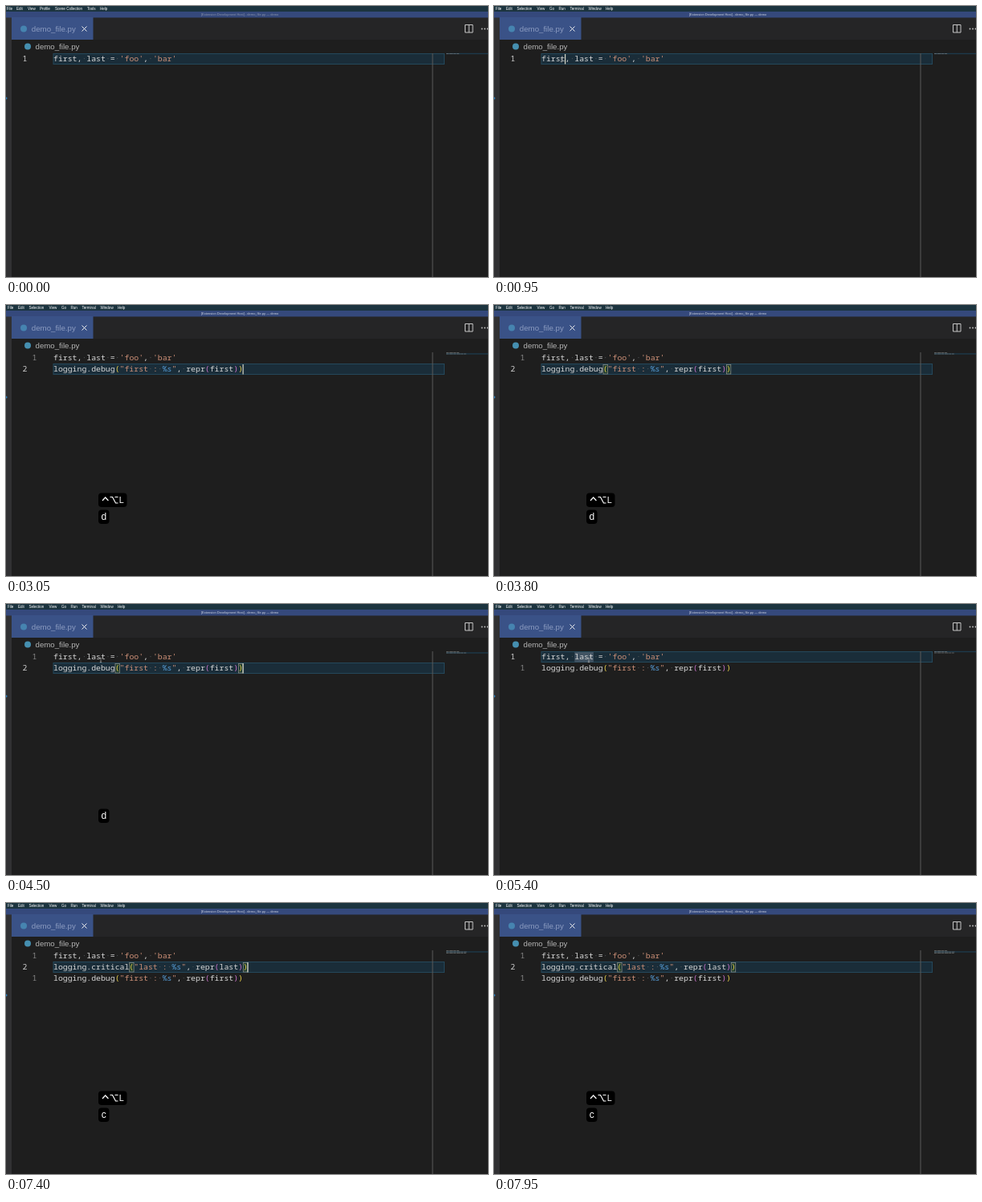
Write an HTML page that moves like this. It is 600x338 px and loops after 8 s.

```html
<!DOCTYPE html>
<html lang="en">
<head>
<meta charset="utf-8">
<title>Logging snippets</title>
<style>
html, body { margin: 0; width: 100%; height: 100%; overflow: hidden; background: #1e1e1e; }
svg { display: block; width: 100vw; height: 100vh; font-family: "Liberation Sans", Arial, sans-serif; }
.code { font: 9.833px "Noto Sans Mono", "DejaVu Sans Mono", monospace; }
</style>
</head>
<body>
<svg viewBox="0 0 600 338">
  <rect width="600" height="338" fill="#1e1e1e"/>
  <rect y="14" width="600" height="28" fill="#252526"/>
  <rect y="14" width="7" height="324" fill="#313133"/>
  <circle cy="115" r="1.5" fill="#2c7fbd"/>
  <rect width="600" height="7" fill="#1c343f"/>
  <rect y="7" width="600" height="7.5" fill="#35497c"/>
  <rect x="7" y="14" width="101.500" height="28" fill="#3a5287"/>
  <circle cx="22" cy="28.500" r="4" fill="#4684b0"/>
  <text x="31.800" y="31.800" font-size="9.700" fill="#8b9bc0">demo_file.py</text>
  <path d="M94.500 25.500l6 6m0-6l-6 6" stroke="#f2f2f2"/>
  <circle cx="27" cy="50.500" r="4" fill="#458fb0"/>
  <text x="36.500" y="53.900" font-size="9.700" fill="#b4b4b4">demo_file.py</text>
  <path d="M571.500 23.500h9.500v9.500h-9.500zM576.300 23.500v9.500" fill="none" stroke="#c5c5c5"/>
  <g fill="#c5c5c5"><circle cx="592.500" cy="28.500" r=".9"/><circle cx="596" cy="28.500" r=".9"/><circle cx="599.500" cy="28.500" r=".9"/></g>
  <g id="scene"></g>
</svg>
<script>
const LOOP = 8000, LEFT = 59, TOP = 59, ROW = 14, CHAR = 5.9;
const FOCUS = 850, KEYS1 = 2100, LOG1 = 3050, CLICK = 4850, KEYS2 = 6650, LOG2 = 7300;
const PLAIN = '#d8d8d8', STR = '#ce9178', FMT = '#569cd6', OUTER = '#e8cf4a', INNER = '#c873c8';

const idleMenu = [['File', 0.8], ['Edit', 13], ['View', 27], ['Profile', 42],
  ['Scene Collection', 61], ['Tools', 101], ['Help', 117]];
const editorMenu = [['File', 2], ['Edit', 15], ['Selection', 28.5], ['View', 53.5], ['Go', 69],
  ['Run', 80.5], ['Terminal', 94.5], ['Window', 117.5], ['Help', 139]];

const assign = [['first, last = ', PLAIN], ["'foo'", STR], [', ', PLAIN], ["'bar'", STR]];
const log = (level, name) => [
  ['logging.' + level, PLAIN], ['(', OUTER], [`"${name} : `, STR], ['%s', FMT], ['"', STR],
  [', repr', PLAIN], ['(', INNER], [name, PLAIN], [')', INNER], [')', OUTER]];
const debugLine = log('debug', 'first'), criticalLine = log('critical', 'last');

// Pointer way points: time, x, y
const paths = [
  [[500, 104, 84], [800, 84, 67], [1300, 84, 67], [1650, 120, 92], [KEYS1, 120, 92]],
  [[4150, 120, 92], [4450, 118, 70], [KEYS2, 118, 70]]];

const scene = document.getElementById('scene');
const colX = n => LEFT + n * CHAR;
const rowY = n => TOP + n * ROW;
const clamp = v => Math.max(0, Math.min(1, v));
const rect = (x, y, w, h, attrs) => `<rect x="${x}" y="${y}" width="${w}" height="${h}" ${attrs}/>`;
const text = (x, y, size, fill, s) => `<text x="${x}" y="${y}" font-size="${size}" fill="${fill}">${s}</text>`;
const lineLength = line => line.reduce((n, [s]) => n + s.length, 0);

function codeRow(line, row, current) {
  const y = rowY(row) + 10.2, active = row === current;
  const spans = line.map(([s, fill]) =>
    `<tspan fill="${fill}">${s.replace(/ /g, '<tspan fill="#505456">·</tspan>')}</tspan>`).join('');
  const number = active ? row + 1 : Math.abs(row - current);
  return `<text class="code" x="${LEFT}" y="${y}">${spans}</text>` +
    `<text class="code" x="${active ? 20.5 : 32.5}" y="${y}" fill="${active ? '#d0d0d0' : '#858585'}">${number}</text>`;
}

function minimap(lines, current) {
  return rect(548, 58.8 + current * 1.5, 52, 1.3, 'fill="#1d3b4d"') + lines.map((line, i) =>
    `<path d="M548 ${59.5 + i * 1.5}h${lineLength(line) * 0.62}" stroke="#85888a" stroke-width=".8" stroke-dasharray="3 .6 5 .5" opacity=".75"/>`).join('');
}

const bracket = (col, row) => rect(colX(col) + 0.3, rowY(row) + 1.5, 5.4, 11.5,
  'fill="#1d3a30" stroke="#8b8b83" stroke-width=".8"');

function cap(label, y, opacity) {
  if (opacity <= 0) return '';
  const chord = label === 'chord';
  const face = chord
    ? `<path d="M120 ${y + 9.5}l3.700-4 3.700 4M129.500 ${y + 5}h3l4 7.500h3M135.500 ${y + 5}h4" fill="none" stroke="#fff" stroke-width="1.200"/>` +
      text(140.7, y + 12.6, 10.8, '#fff', 'L')
    : `<text x="121.800" y="${y + 12.6}" font-size="12" fill="#fff" text-anchor="middle">${label}</text>`;
  return `<g opacity="${opacity}">${rect(115, y, chord ? 35.5 : 13.5, 17.5, 'rx="4" fill="#000"')}${face}</g>`;
}

function keys(t) {
  if (t >= KEYS2) {
    return t < LOG2 ? cap('chord', 255.5, 1) : cap('chord', 234.5, 1) + cap('c', 255.5, 1);
  }
  if (t < KEYS1) return '';
  if (t < LOG1) return cap('chord', 255.5, 1);
  return cap('chord', 234.5, clamp((4450 - t) / 250)) + cap('d', 255.5, clamp((5350 - t) / 300));
}

function pointer(t) {
  const path = paths.find(p => t >= p[0][0] && t < p[p.length - 1][0]);
  if (!path) return '';
  const i = path.findIndex(p => p[0] > t), [t0, x0, y0] = path[i - 1], [t1, x1, y1] = path[i];
  const k = (t - t0) / (t1 - t0), e = k * k * (3 - 2 * k);
  const x = x0 + (x1 - x0) * e, y = y0 + (y1 - y0) * e;
  return `<path d="M${x - 1.2} ${y - 2.6}h2.400M${x} ${y - 2.6}v5.200M${x - 1.2} ${y + 2.6}h2.400" stroke="#b5b5b5" stroke-width=".7"/>`;
}

// Editor contents and caret at a given time
function editor(t) {
  if (t < LOG1) return { lines: [assign], row: 0, col: 5, since: FOCUS, word: [0, 5] };
  if (t < CLICK) return { lines: [assign, debugLine], row: 1, col: 40, since: LOG1, pair: [13, 39] };
  if (t < LOG2) {
    return { lines: [assign, debugLine], row: 0, col: 10, since: t < 5600 ? CLICK : 5600, word: [7, 4], moved: CLICK };
  }
  return { lines: [assign, criticalLine, debugLine], row: 1, col: 41, since: LOG2, pair: [16, 40] };
}

function draw(t) {
  const focused = t >= FOCUS, { lines, row, col, since, word, pair, moved = since } = editor(t);
  let out = (focused ? editorMenu : idleMenu).map(([s, x]) => text(x, 5, 4.55, '#fff', s)).join('');
  out += text(243, 12.4, 4, focused ? '#d3d8e5' : '#8e96ad', '[Extension Development Host] - demo_file.py — demo');
  out += rect(LEFT, rowY(row) + 0.5, 486.5, 13, 'fill="#1a2d39" stroke="#24485b"');
  out += rect(530.5, TOP, 1, 279, 'fill="#5a5a5a"');
  if (word && t >= moved + 250) {
    out += rect(colX(word[0]), rowY(row) + 1, word[1] * CHAR, 12.5, 'fill="#425362"');
  }
  if (pair && t >= since + 100) out += bracket(pair[0], row) + bracket(pair[1], row);
  out += lines.map((line, i) => codeRow(line, i, row)).join('') + minimap(lines, row);
  if (focused && (t - since) % 1000 < 500) out += rect(colX(col) - 0.5, rowY(row) + 1, 1.2, 12.5, 'fill="#d8d8c8"');
  return out + keys(t) + pointer(t);
}

let last = '';
function frame() {
  const markup = draw(performance.now() % LOOP);
  if (markup !== last) scene.innerHTML = last = markup;
  requestAnimationFrame(frame);
}
frame();
</script>
</body>
</html>
```
